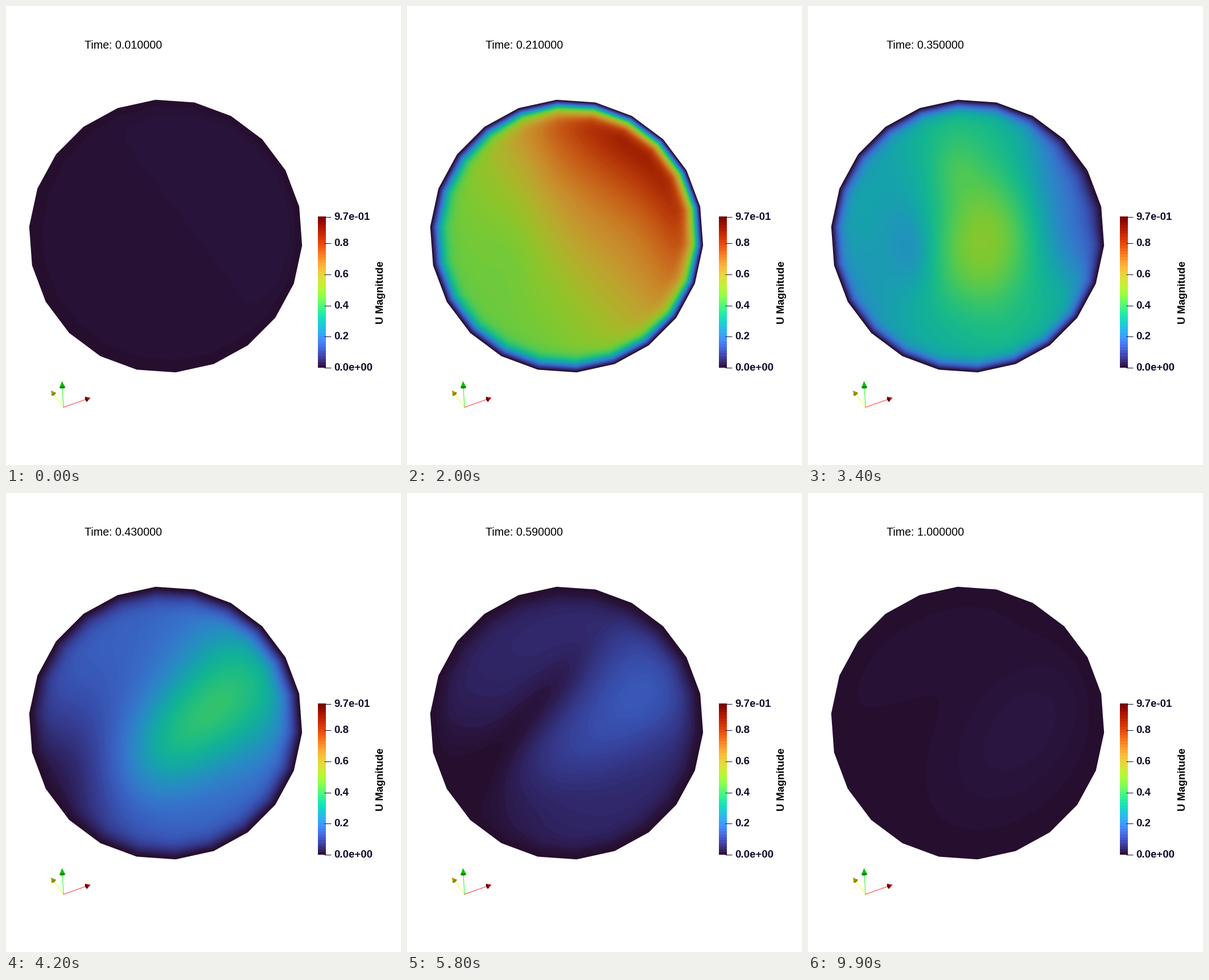
Animation of 694x807 px, one loop 10000 ms. Source, as a matplotlib script:

```python
import numpy as np
import matplotlib.pyplot as plt
from matplotlib.animation import FuncAnimation
from matplotlib.patches import Ellipse, Polygon

W, H, DPI = 694, 807, 100
FRAMES, INTERVAL = 100, 100
PX = 72 / DPI
VMAX, LEVELS, LIGHT = 0.97, 200, 0.79
CX, CY, RADIUS, SIDES = 280.5, 404.5, 240.3, 22
X0, X1, Y0, Y1 = 38, 523, 162, 647

# vessel cross-section: a regular polygon, and each pixel's depth inside it
step = 2 * np.pi / SIDES
corners = np.radians(265.8) + step * np.arange(SIDES)
outline = np.column_stack([CX + RADIUS * np.cos(corners),
                           CY + RADIUS * np.sin(corners)])
gx, gy = np.meshgrid(np.arange(X0, X1) + 0.5, np.arange(Y0, Y1) + 0.5)
reach = np.max([(gx - CX) * np.cos(a) + (gy - CY) * np.sin(a)
                for a in corners + step / 2], axis=0)
depth = np.maximum(RADIUS * np.cos(step / 2) - reach, 0)


def wall(delta):
    """No-slip layer: zero at the wall, one in the core."""
    return 1 - np.exp(-(depth / delta) ** 1.5)


def blob(cx, cy, long, wide, deg=90, power=1):
    """Soft ellipse of height one; its long axis points along deg."""
    a = np.radians(deg)
    dx, dy = gx - cx, gy - cy
    u = dx * np.cos(a) + dy * np.sin(a)
    v = dy * np.cos(a) - dx * np.sin(a)
    return np.exp(-0.5 * ((u / long) ** 2 + (v / wide) ** 2) ** power)


def flow(core, delta):
    return np.maximum(core, 0) * wall(delta)


slope = (gx - 213) * 0.797 - (gy - 245) * 0.604
inflow = flow(0.19 + 5e-4 * slope + 1e-6 * slope ** 2, 19)

jet = 0.14 * blob(290, 375, 140, 42, 77) + 0.07 * blob(255, 285, 38, 30)
vortex = 0.16 * blob(185, 430, 52, 28, 82) + 0.09 * blob(135, 290, 80, 55)
stall = 0.97 * blob(470, 335, 118, 79, 78, 1.3)
peak = flow((0.57 + jet - vortex) * (1 - stall), 12.5)

fall = flow(0.15 + 0.15 * blob(420, 335, 95, 80)
            + 0.18 * blob(300, 430, 100, 60, -45)
            - 0.13 * blob(90, 520, 110, 110), 23)
swirl = flow(0.045 + 0.06 * blob(415, 320, 75, 75)
             + 0.05 * blob(335, 420, 110, 50, -30)
             - 0.035 * blob(235, 370, 110, 28, -50)
             - 0.045 * blob(95, 520, 100, 100), 26)
eddy = flow(0.02 + 0.045 * blob(220, 370, 90, 72)
            + 0.015 * blob(450, 310, 100, 36, 55)
            - 0.018 * blob(380, 530, 80, 50, -60), 26)
rest = flow(0.0015 + 0.0165 * blob(372, 420, 115, 72, -50)
            + 0.0065 * blob(200, 275, 150, 52, -32), 26)

PHASES = [(27, peak), (42, fall), (58, swirl), (72, eddy), (99, rest)]


def surge(i):
    u = np.clip((i - 10.5) / 10, 0, 1)
    return 0.051 + 3.4 * np.sin(np.pi / 2 * u) ** 2


def field_at(i):
    start = PHASES[0][0]
    if i <= start:
        u = np.clip((i - 18) / (start - 18), 0, 1)
        w = u * u * (3 - 2 * u)
        return (1 - w) * surge(i) * inflow + w * peak
    for (ta, a), (tb, b) in zip(PHASES, PHASES[1:]):
        if i <= tb:
            k = 5 if b is rest else 1
            w = np.expm1(-k * (i - ta) / (tb - ta)) / np.expm1(-k)
            return a + (b - a) * w


turbo = plt.get_cmap("turbo")
lut = turbo(np.linspace(0, 1, LEVELS))[:, :3] * LIGHT
lut = np.round(lut * 255).astype(np.uint8)


def shade(field):
    idx = (field / VMAX * LEVELS).astype(int)
    return lut[np.clip(idx, 0, LEVELS - 1)]


plt.rcParams["font.family"] = "Liberation Sans"
fig = plt.figure(figsize=(W / DPI, H / DPI), dpi=DPI, facecolor="white")
ax = fig.add_axes([0, 0, 1, 1])

disc = ax.imshow(shade(field_at(0)), extent=(X0, X1, Y1, Y0),
                 interpolation="nearest", aspect="auto")
disc.set_clip_path(Polygon(outline, transform=ax.transData))

# colour legend
TOP, BOTTOM, BANDS = 370.5, 636, 52
INK = (0.06, 0.04, 0.16)
ax.imshow(turbo(np.linspace(1, 0, BANDS))[:, None],
          extent=(548, 562, BOTTOM, TOP), interpolation="nearest",
          aspect="auto")
for value in (0, 0.2, 0.4, 0.6, 0.8, VMAX):
    y = BOTTOM - (BOTTOM - TOP) * value / VMAX
    label = f"{value:.1e}" if value in (0, VMAX) else f"{value:.1f}"
    ax.plot([559, 571], [y, y], color=INK, lw=PX, solid_capstyle="butt")
    ax.text(576.3, y + 5, label, size=18.7 * PX, weight="bold", color=INK)
ax.text(663, 559, "U Magnitude", size=18.5 * PX, weight="bold",
        rotation=90, rotation_mode="anchor")


def axis_arrow(tip, length, width, line, body, base):
    """Thin line from the shared origin, ending in a shaded cone."""
    origin, tip = np.array([101, 705.5]), np.array(tip)
    d = (tip - origin) / np.hypot(*(tip - origin))
    side = np.array([-d[1], d[0]]) * width / 2
    foot = tip - d * length
    ax.plot(*zip(origin, foot), color=line, lw=PX)
    ax.add_patch(Polygon([tip, foot + side, foot - side], fc=body, zorder=3))
    ax.add_patch(Ellipse(foot, width * 0.4, width, fc=base, zorder=4,
                         angle=np.degrees(np.arctan2(d[1], d[0]))))


axis_arrow((79, 676), 8, 9, "#ffff20", "#a89c00", "#8c8200")
axis_arrow((98.4, 659.5), 11, 10, "#20ff20", "#00c400", "#008a00")
axis_arrow((148.5, 688.8), 8, 9, "#ff3030", "#b00000", "#5c0000")

clock = ax.text(138.4, 75, "", size=19.7 * PX)

ax.set_xlim(0, W)
ax.set_ylim(H, 0)
ax.axis("off")


def update(i):
    disc.set_data(shade(field_at(i)))
    clock.set_text(f"Time: {(i + 1) / FRAMES:.6f}")
    return disc, clock


anim = FuncAnimation(fig, update, frames=FRAMES, interval=INTERVAL,
                     repeat=True, repeat_delay=0, blit=False)
plt.show()
```
